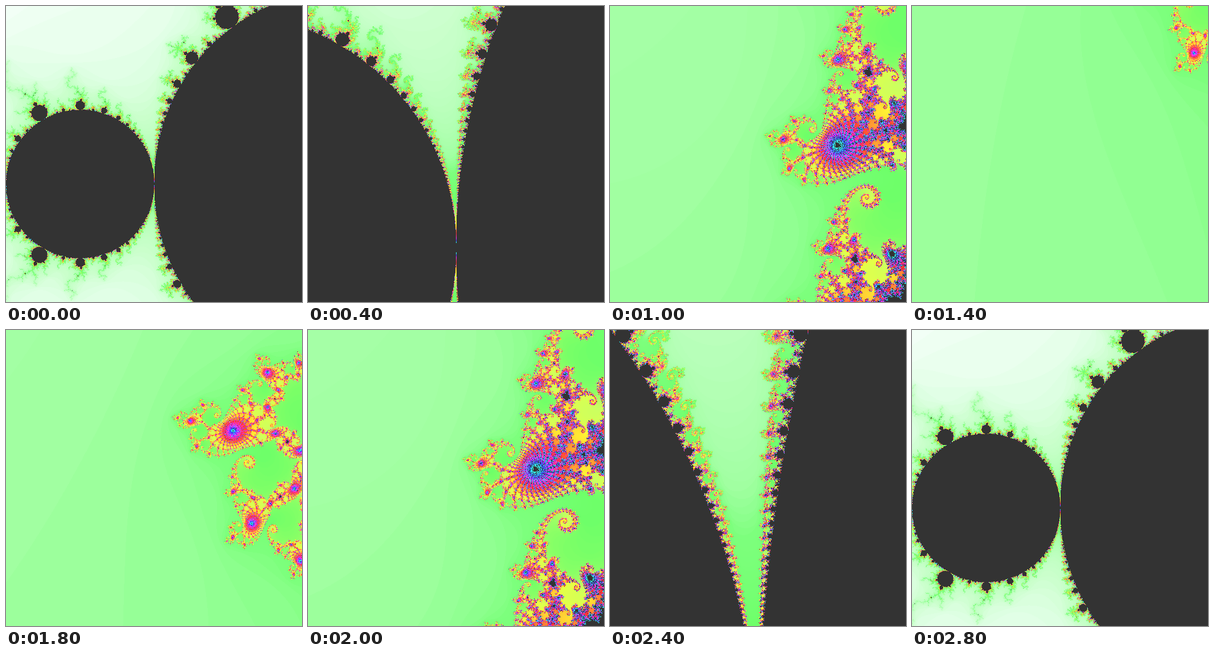
Write an HTML page with a canvas that moves like this. It is 512 px wide and 512 px high and loops after 3 s.

```html
<!DOCTYPE html>
<html lang="en">
<head>
<meta charset="utf-8">
<title>Mandelbrot zoom</title>
<style>
  html, body { margin: 0; width: 100%; height: 100%; overflow: hidden; background: #333; }
  canvas { display: block; width: 100%; height: 100%; image-rendering: pixelated; }
</style>
</head>
<body>
<canvas id="stage" width="512" height="512"></canvas>
<script>
const SIZE = 512, LIMIT = 640, STEP = 200, STEPS = 15, VIEWS = 7;
const CENTER = { re: -0.75, im: 0.1 };
const INSIDE = 0xff333333;

// Colour stops: [iterations, value]
const HUE = [[0, 140], [12, 122], [62, 118], [90, 80], [115, 60], [200, 0],
             [300, -60], [410, -120], [520, -180], [LIMIT, -190]];
const SATURATION = [[0, 0], [12, 0.2], [31, 0.37], [38, 0.51], [62, 0.59], [90, 0.62],
                    [115, 0.8], [LIMIT, 0.8]];

function ramp(stops, n) {
  const i = Math.max(1, stops.findIndex(([x]) => x >= n));
  const [x0, y0] = stops[i - 1], [x1, y1] = stops[i];
  return y0 + (y1 - y0) * (n - x0) / (x1 - x0);
}

function colorOf(n) {
  const hue = ramp(HUE, n) + 360, sat = ramp(SATURATION, n);
  const channel = offset => {
    const k = (offset + hue / 60) % 6;
    return Math.round(255 * (1 - sat * Math.max(0, Math.min(k, 4 - k, 1))));
  };
  return (255 << 24 | channel(1) << 16 | channel(3) << 8 | channel(5)) >>> 0;
}

const palette = Uint32Array.from({ length: LIMIT + 1 }, (_, n) => n < LIMIT ? colorOf(n) : INSIDE);

function escapeTime(re, im) {
  // Skip the main cardioid and the period-2 disc
  const dx = re - 0.25, im2 = im * im, q = dx * dx + im2;
  if (q * (q + dx) <= im2 / 4 || (re + 1) ** 2 + im2 <= 0.0625) return LIMIT;
  let x = 0, y = 0, xx = 0, yy = 0, n = 0;
  while (xx + yy <= 4 && n < LIMIT) {
    y = 2 * x * y + im;
    x = xx - yy + re;
    xx = x * x;
    yy = y * y;
    n++;
  }
  return n;
}

function render(view) {
  const image = new ImageData(SIZE, SIZE);
  const pixels = new Uint32Array(image.data.buffer);
  const scale = 10 ** (-view / 2) / SIZE;
  for (let row = 0, i = 0; row < SIZE; row++) {
    const im = CENTER.im - (row - SIZE / 2) * scale;
    for (let col = 0; col < SIZE; col++) {
      pixels[i++] = palette[escapeTime(CENTER.re + (col - SIZE / 2) * scale, im)];
    }
  }
  return image;
}

const context = document.getElementById("stage").getContext("2d");
const images = Array.from({ length: VIEWS }, (_, view) => render(view));
let shown = -1;

function draw() {
  const step = Math.floor(performance.now() / STEP) % STEPS;
  const view = step < 8 ? Math.max(0, step - 1) : 14 - step;
  if (view !== shown) context.putImageData(images[view], 0, 0);
  shown = view;
  requestAnimationFrame(draw);
}
draw();
</script>
</body>
</html>
```
